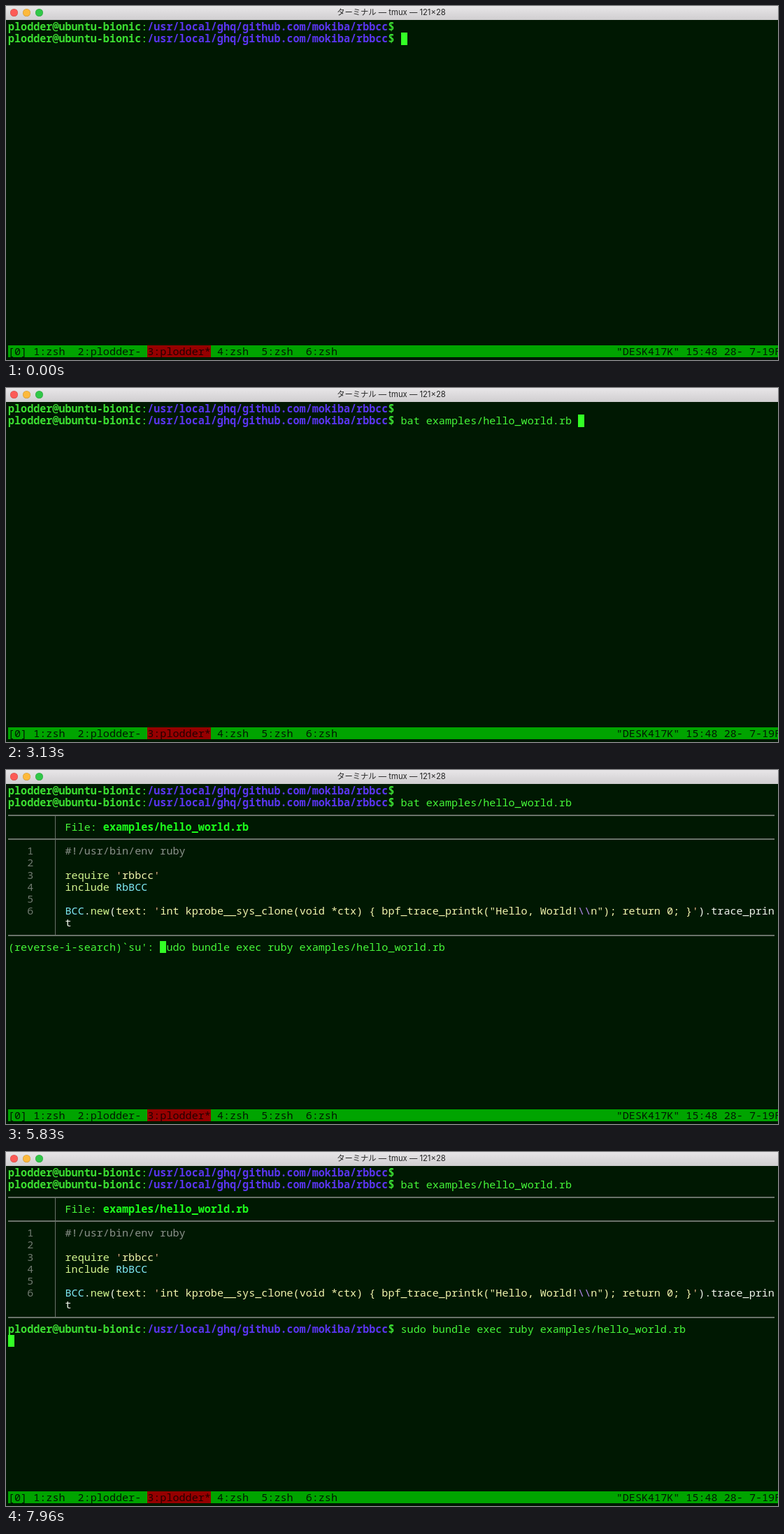
An HTML page for the animation above (8000 ms loop, 1104 by 507 pixels).

```html
<!DOCTYPE html>
<html lang="ja">
<head>
<meta charset="utf-8">
<title>Terminal</title>
<style>
  :root { --cell: 9.06px; --line: 17.2px; --left: 3px; --top: 21.2px; }
  html, body { margin: 0; width: 100%; height: 100%; overflow: hidden; background: #001802; }
  #stage { position: relative; width: 1104px; height: 507px; overflow: hidden; background: #001802; }
  #bar {
    position: absolute; inset: 0 0 auto; height: 20px;
    background: linear-gradient(#e8e6e8, #d0ced0);
    font: 11.3px/19px Inter, "Noto Sans CJK JP", "Noto Sans CJK", sans-serif;
    color: #262626; text-align: center; text-indent: -2px; white-space: nowrap;
  }
  #bar i {
    position: absolute; top: 3.5px; width: 11px; height: 11px; border-radius: 50%;
    box-shadow: inset 0 0 0 0.5px #0003;
  }
  .row, #caret, #status, .rule { position: absolute; }
  .row {
    left: var(--left); top: calc(var(--top) + var(--r) * var(--line));
    font: 500 15.1px/var(--line) "Noto Sans Mono", monospace;
    font-variant-ligatures: none; font-kerning: none;
    white-space: pre; color: #46f83a;
  }
  .row b { color: #3cdf32; }
  .row b.path { color: #5a35f0; }
  .row b.file { color: #1cff1c; }
  .row.dim, .dim { color: #707a70; }
  .note { color: #8b928b; }
  .call { color: #d3f590; }
  .type { color: #7fe9f5; }
  .str { color: #f3f4ae; }
  .quote { color: #f0b88c; }
  .esc { color: #b78bf0; }
  .row.plain { color: #f0f5ec; }
  .rule { background: #6a726a; }
  .across { left: 3px; width: 1096px; height: 2px; }
  #status { left: 3px; right: 0; top: 486px; height: 17px; background: #00a400; }
  #status ~ .row { color: #001802; font-weight: 400; }
  .active { display: inline-block; height: 17px; background: #960000; color: #240000; }
  #caret {
    left: calc(var(--left) + var(--c) * var(--cell));
    top: calc(var(--top) + var(--r) * var(--line));
    width: var(--cell); height: var(--line); background: #33ff26;
  }
  [hidden] { display: none; }
</style>
</head>
<body>
<div id="stage">
  <div id="bar">
    <i style="left:5.5px;background:#fc5b57"></i>
    <i style="left:23.5px;background:#fdb93c"></i>
    <i style="left:41.5px;background:#31c748"></i>ターミナル — tmux — 121×28</div>

  <div class="row" style="--r:0"><span class="prompt"></span></div>
  <div class="row" style="--r:1"><span class="prompt"></span><span id="first"></span></div>

  <div id="listing" hidden>
    <div class="rule across" style="top:64px"></div>
    <div class="rule across" style="top:98px"></div>
    <div class="rule across" style="top:236px"></div>
    <div class="rule" style="left:70px;top:64px;width:1px;height:173px"></div>
    <div class="row" style="--r:3">         File: <b class="file">examples/hello_world.rb</b></div>
    <div class="row" style="--r:5"><span class="dim">   1     </span><span class="note">#!/usr/bin/env ruby</span></div>
    <div class="row dim" style="--r:6">   2</div>
    <div class="row" style="--r:7"><span class="dim">   3     </span><span class="call">require</span> <span class="quote">'</span><span class="str">rbbcc</span><span class="quote">'</span></div>
    <div class="row" style="--r:8"><span class="dim">   4     </span><span class="call">include</span> <span class="type">RbBCC</span></div>
    <div class="row dim" style="--r:9">   5</div>
    <div class="row plain" style="--r:10"><span class="dim">   6     </span><span class="type">BCC</span>.<span class="call">new</span>(<span class="str">text: </span><span class="quote">'</span><span class="str">int kprobe__sys_clone(void *ctx) { bpf_trace_printk("Hello, World!</span><span class="esc">\\</span><span class="str">n"); return 0; }</span><span class="quote">'</span>).trace_prin</div>
    <div class="row plain" style="--r:11">         t</div>
    <div class="row" style="--r:13"><span class="prompt" id="shell"></span><span id="second"></span></div>
  </div>

  <div id="status"></div>
  <div class="row" style="--r:27">[0] 1:zsh  2:plodder- <span class="active">3:plodder*</span> 4:zsh  5:zsh  6:zsh</div>
  <div class="row" style="--r:27;left:calc(var(--left) + 96 * var(--cell))">"DESK417K" 15:48 28- 7-19F</div>
  <div id="caret"></div>
</div>
<script>
  const LOOP = 8000, BLINK = 600, PROMPT = 62;
  const byId = id => document.getElementById(id);
  const [first, second, shell, listing, caret] =
    ['first', 'second', 'shell', 'listing', 'caret'].map(byId);

  for (const p of document.querySelectorAll('.prompt'))
    p.innerHTML = '<b>plodder@ubuntu-bionic</b>:<b class="path">/usr/local/ghq/github.com/mokiba/rbbcc</b><b>$</b> ';

  const bat = 'bat examples/hello_world.rb ';
  const run = 'sudo bundle exec ruby examples/hello_world.rb';

  const typed = (at, n) => ({ at, text: bat.slice(0, n), row: 1, col: PROMPT + n });
  const search = (at, query) => {
    const head = `(reverse-i-search)\`${query}': `;
    return { at, listed: true, search: true, text: head + (query && run), row: 13, col: head.length };
  };
  const prompt = (at, text, row, col) => ({ at, listed: true, text, row, col });

  const steps = [
    typed(0, 0), typed(800, 1), typed(930, 2), typed(1050, 3), typed(1180, 4),
    typed(1600, 5), typed(1740, 6), typed(1950, 13),
    typed(2350, 14), typed(2500, 15), typed(2850, bat.length),
    prompt(3700, '', 13, PROMPT),
    search(5100, ''), search(5450, 's'), search(5650, 'su'),
    prompt(6400, run, 13, PROMPT + 1),
    prompt(7450, run, 14, 0),
  ];

  let shown;
  function show(step) {
    shown = step;
    listing.hidden = !step.listed;
    shell.hidden = !!step.search;
    first.textContent = step.listed ? bat : step.text;
    second.textContent = step.listed ? step.text : '';
    caret.style.setProperty('--r', step.row);
    caret.style.setProperty('--c', step.col);
  }

  const start = performance.now();
  function draw(now) {
    const t = Math.max(0, now - start) % LOOP;
    const step = steps.findLast(s => s.at <= t);
    if (step !== shown) show(step);
    // The blink restarts with every key press.
    caret.hidden = Math.floor((t - step.at) / BLINK) % 2 === 1;
    requestAnimationFrame(draw);
  }
  draw(start);
</script>
</body>
</html>
```
